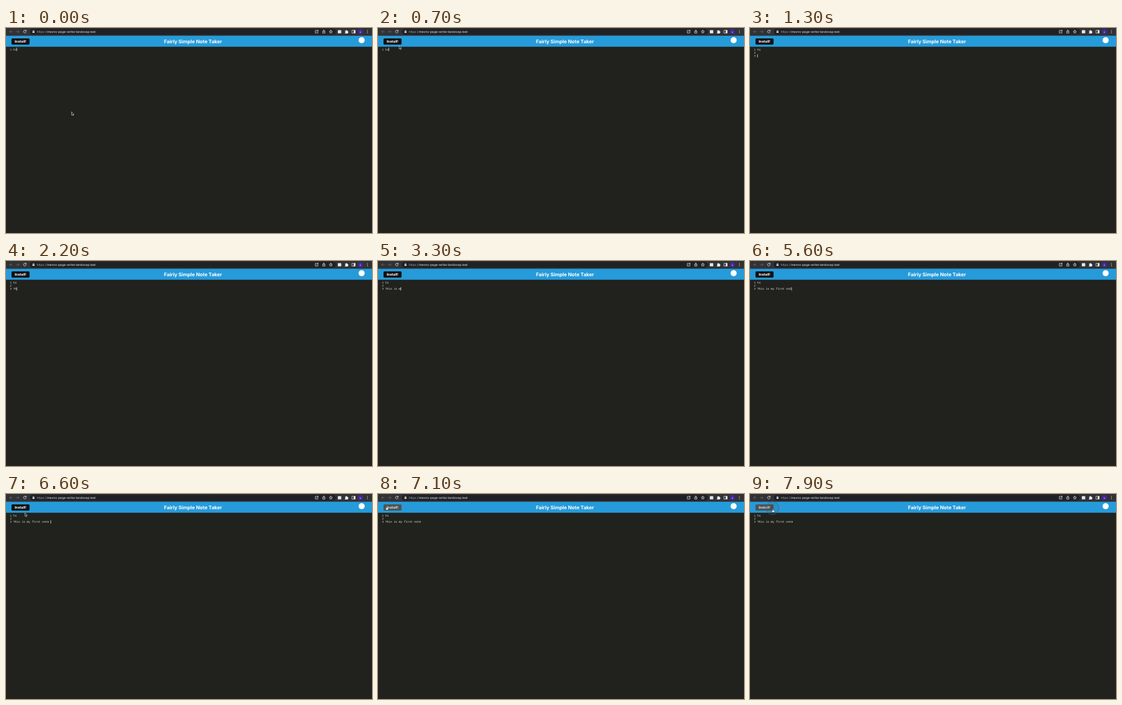
These frames come from a looping animation (600 px wide and 336 px high, 8 s). An HTML page:

```html
<!DOCTYPE html>
<html lang="en">
<head>
<meta charset="utf-8">
<title>Note editor</title>
<style>
  html, body { margin: 0; width: 100%; height: 100%; overflow: hidden; background: #21221d; }
  svg { display: block; width: 100vw; height: 100vh; }
  text { text-rendering: geometricPrecision; white-space: pre; }
  .ui { font-family: Inter, "Open Sans", sans-serif; }
  .code { font: 4.65px "Liberation Mono", "DejaVu Sans Mono", monospace; fill: #f4f4ee; }
  .num { fill: #cfcfc8; }
  .line { fill: none; stroke: #dfe1e5; stroke-width: .75; stroke-linecap: round; stroke-linejoin: round; }
  .dim { stroke: #696b6f; }
</style>
</head>
<body>
<svg viewBox="0 0 600 336" preserveAspectRatio="none">
  <rect width="600" height="336" fill="#21221d"/>

  <!-- browser bar -->
  <rect width="600" height="13" fill="#313236"/>
  <rect x="39" y="1.3" width="502" height="9.6" rx="4.8" fill="#202124"/>
  <path class="line dim" d="M10.6 6H5.8M7.9 3.9 5.8 6l2.1 2.1M16.6 6h4.8M19.3 3.9 21.4 6l-2.1 2.1"/>
  <path class="line" d="M32.7 4.4A2.3 2.3 0 1 0 33.1 6.6M33 3.4v1.7h-1.7"/>
  <rect x="43.5" y="5.4" width="3.2" height="2.7" rx=".4" fill="#d5d7da"/>
  <path class="line" stroke-width=".6" d="M44.2 5.4v-.7a.9.9 0 0 1 1.8 0v.7"/>
  <text class="ui" x="50.5" y="7.8" font-size="5" fill="#9aa0a6">https://<tspan fill="#e8eaed">mevno-page-writer.tandovap.test</tspan></text>
  <path class="line" d="M509 3.9h-2v4.3h4.3V6.4M509.2 6l2.3-2.3M510 3.7h1.6v1.6"/>
  <path class="line" d="M520 5.3h-.9v3.1h3.8V5.3H522M521 6.7V3.3M519.9 4.3 521 3.2l1.1 1.1"/>
  <path id="star" class="line"/>
  <rect x="544" y="3.4" width="5.6" height="5.4" rx=".6" fill="#e3e5e8"/>
  <path fill="#f1f3f4" d="M555.7 4.4h1.4a1 1 0 0 1 2 0h1.3v1.4a1 1 0 0 1 0 2v1.1h-4.7V7.6a.9.9 0 0 0 0-1.8z"/>
  <path class="line" d="M567.5 3.8h5v4.5h-5z"/>
  <rect x="570" y="3.7" width="2.6" height="4.7" fill="#e8eaed"/>
  <circle cx="581" cy="6" r="4.2" fill="#4527a0"/>
  <text class="ui" x="581" y="7.5" font-size="4.2" text-anchor="middle" fill="#fff">c</text>
  <g id="dots" fill="#e8eaed"></g>

  <!-- page header -->
  <rect y="12.7" width="600" height="18" fill="#269bda"/>
  <rect id="button" x="9" y="17" width="29.6" height="10.2" rx="1.6"/>
  <text id="label" class="ui" x="23.7" y="24.1" font-size="5.8" font-weight="700" text-anchor="middle">Install!</text>
  <text class="ui" x="306.5" y="24.9" font-size="8.05" font-weight="700" text-anchor="middle" fill="#fff">Fairly Simple Note Taker</text>
  <circle cx="583" cy="20" r="5" fill="#fff"/>

  <!-- editor -->
  <text class="code num" x="6.6" y="36.7">1</text>
  <text class="code num" id="num2" x="6.6" y="42.1">2</text>
  <text class="code num" id="num3" x="6.6" y="47.4">3</text>
  <text class="code" x="12" y="36.7">hi</text>
  <text class="code" id="typed" x="12" y="47.4"></text>
  <rect id="caret" width=".7" height="5.4" fill="#f8f8f0"/>

  <!-- pointers -->
  <circle id="ring" cx="37" cy="23" r="10.5" fill="#202a30" fill-opacity=".08" stroke="#4b6271" stroke-width=".8"/>
  <path id="arrow" d="M0 0V5.4L1.25 4.3 2.1 6.2 3 5.8 2.2 4H3.9Z" fill="#111" stroke="#fff" stroke-width=".55" stroke-linejoin="round"/>
  <path id="beam" d="M-1-2.6Q0-2.6 0-1.8V1.8Q0 2.6-1 2.6M1-2.6Q0-2.6 0-1.8M0 1.8Q0 2.6 1 2.6" fill="none" stroke="#e6e6e6" stroke-width=".5"/>
  <path id="hand" d="M-.5 0Q0-.6.5 0V2L2.6 2.6Q3.1 2.9 2.9 3.7L2.4 5.4H-.5L-1.9 3.3Q-1.9 2.6-1.2 2.8L-.5 3.4Z" fill="#fff" stroke="#161616" stroke-width=".4" stroke-linejoin="round"/>
</svg>
<script>
const LOOP = 8000, STEP = 100;
const NOTE = "This is my first note ";
const KEYS = [2000, 2200, 2300, 2400, 2600, 2900, 3000, 3100, 3300, 3600, 3700,
  4000, 4200, 4300, 4500, 4700, 5000, 5100, 5400, 5500, 5800, 5900];
const CHAR_W = 2.79, TEXT_X = 12, LINE_H = 5.35;
const CARET_OFF = [[1000, 1200], [1800, 2000], [6300, 6600], [7000, 7500], [7800, 8000]];
// time, x, y of the pointer
const PATH = [[0, 107.5, 137.5], [700, 34.7, 29], [900, 34.5, 33], [1000, 35.5, 37.5], [1200, 35.5, 37.5],
  [6600, 31, 31], [6800, 22, 24], [7100, 14, 20.5], [7400, 15, 20.5], [7800, 37.3, 24.5], [8000, 37.3, 24.5]];

const el = id => document.getElementById(id);
const within = (t, a, b) => t >= a && t < b;
const show = (id, on) => el(id).setAttribute("visibility", on ? "visible" : "hidden");
const ease = p => p * p * (3 - 2 * p);

function pointerAt(t) {
  const i = Math.max(1, PATH.findIndex(p => p[0] > t));
  const [t0, x0, y0] = PATH[i - 1], [t1, x1, y1] = PATH[i];
  const p = ease((t - t0) / (t1 - t0));
  return [x0 + (x1 - x0) * p, y0 + (y1 - y0) * p];
}

function buildIcons() {
  const points = Array.from({ length: 10 }, (_, i) => {
    const a = i * Math.PI / 5 - Math.PI / 2, r = i % 2 ? 1.25 : 2.8;
    return (532.5 + r * Math.cos(a)).toFixed(2) + " " + (6.2 + r * Math.sin(a)).toFixed(2);
  });
  el("star").setAttribute("d", "M" + points.join("L") + "Z");
  el("dots").innerHTML = [4, 6, 8].map(y => `<circle cx="592.5" cy="${y}" r=".6"/>`).join("");
}

function draw(t) {
  const count = KEYS.filter(k => k <= t).length;
  const row = t < 1200 ? 0 : t < 1300 ? 1 : 2;
  const col = row === 0 ? 2 : count;
  el("typed").textContent = NOTE.slice(0, count);
  show("num2", row >= 1);
  show("num3", row >= 2);

  el("caret").setAttribute("x", TEXT_X + col * CHAR_W - .1);
  el("caret").setAttribute("y", 32.3 + row * LINE_H);
  show("caret", !CARET_OFF.some(([a, b]) => within(t, a, b)));

  const hover = t >= 6800;
  el("button").setAttribute("fill", hover ? "#4d5355" : "#111214");
  el("label").setAttribute("fill", hover ? "#dedfdd" : "#fff");

  const [x, y] = pointerAt(t);
  for (const id of ["arrow", "beam", "hand"]) el(id).setAttribute("transform", `translate(${x} ${y})`);
  show("arrow", t < 1000 || within(t, 6600, 6800));
  show("beam", within(t, 1000, 1200));
  show("hand", hover);
  show("ring", t >= 7800);
}

buildIcons();
const start = performance.now();
function tick() {
  const t = (performance.now() - start) % LOOP;
  draw(Math.floor(t / STEP) * STEP);
  requestAnimationFrame(tick);
}
tick();
</script>
</body>
</html>
```
